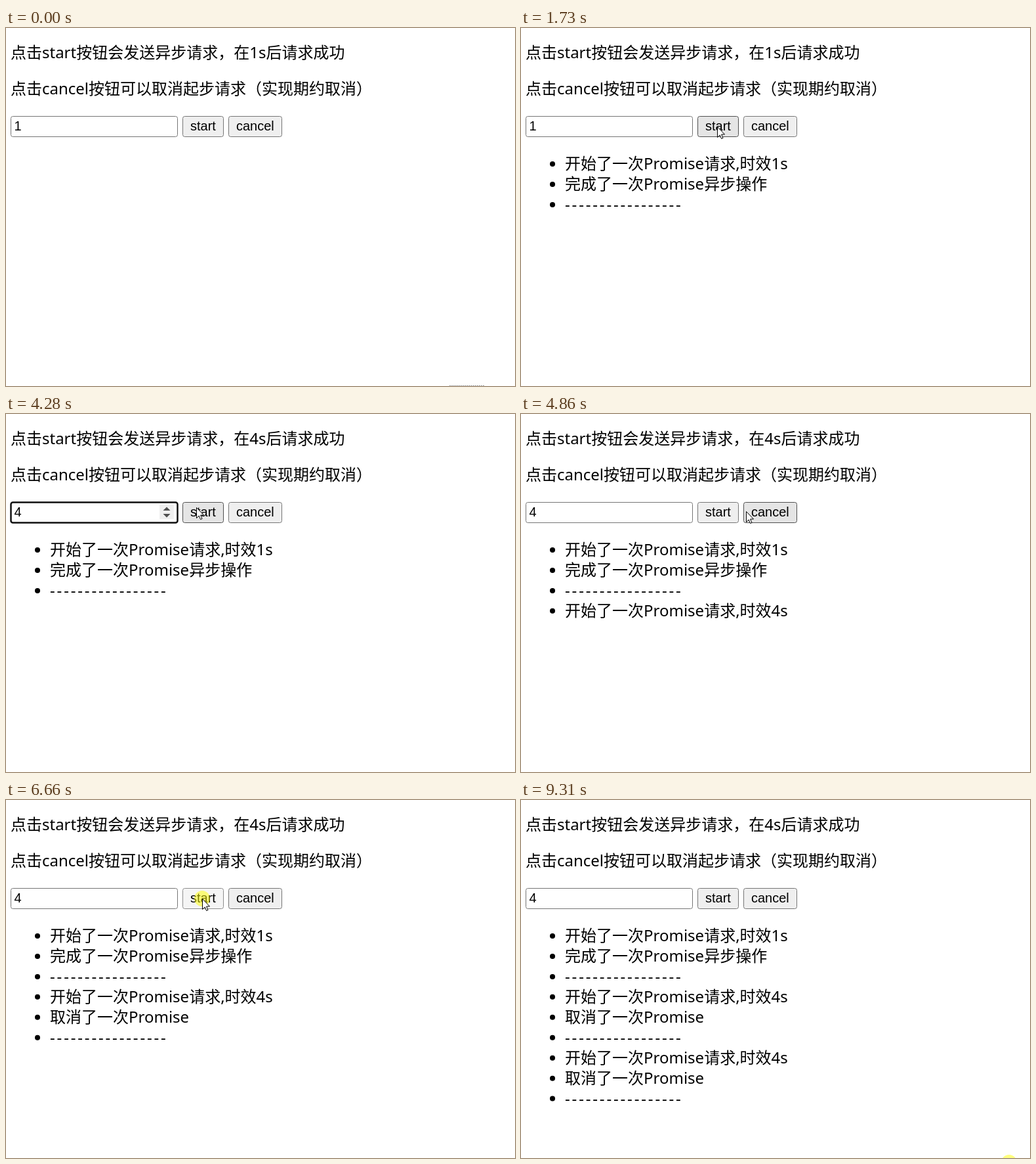
Animation, 776 px wide and 545 px high, one loop 9360 ms. Source, as an HTML page:

```html
<!DOCTYPE html>
<html lang="zh-CN">
<head>
<meta charset="utf-8">
<style>
  html, body { margin: 0; width: 100%; height: 100%; overflow: hidden; background: #fff; }
  svg { display: block; }
  text { font: 24px "Noto Sans", "Noto Sans CJK SC", sans-serif; white-space: pre; }
  .ui { font: 20px "Liberation Sans", Arial, sans-serif; }
  .rule { letter-spacing: 2.84px; font-weight: 300; }
  .button rect { fill: #efefef; stroke: #767676; }
  .button.hover rect { fill: #e5e5e5; stroke: #4f4f4f; }
  .button.down rect { fill: #f5f5f5; stroke: #8d8d8d; }
</style>
</head>
<body>
<svg width="776" height="545" viewBox="0 0 776 545">
  <text id="intro" x="7" y="46"></text>
  <text x="7" y="101">点击cancel按钮可以取消起步请求（实现期约取消）</text>
  <rect id="field" x="7.5" y="134.5" width="254" height="31" rx="3" fill="#fff"/>
  <text id="value" class="ui" x="12.5" y="156"></text>
  <g id="spinner">
    <path fill="#efefef" d="M234 138h22v22h-22z"/>
    <path id="up" fill="#d0d0d0" d="M234 138h22v11h-22z"/>
    <path fill="#505050" d="M239.5 147l5.5-5.5 5.5 5.5zM239.5 152l5.5 5.5 5.5-5.5z"/>
  </g>
  <g id="start" class="button">
    <rect x="269.5" y="134.5" width="62" height="31" rx="3"/>
    <text class="ui" x="281" y="156">start</text>
  </g>
  <g id="cancel" class="button">
    <rect x="339.5" y="134.5" width="81" height="31" rx="3"/>
    <text class="ui" x="351" y="156">cancel</text>
  </g>
  <g id="list"></g>
  <path id="dots" d="M676 544.5h53" stroke="#999" stroke-dasharray="2 1"/>
  <g id="pointer">
    <circle id="glow" r="12" fill="#ff0" fill-opacity=".5"/>
    <path d="M.5 .5V16.5L4.2 13L6.6 18.5L9 17.5L6.6 12H11.5Z" fill="#fff" stroke="#000"/>
  </g>
</svg>
<script>
const LOOP = 9360, HOLD = 90, ROW = 30.95;
const SPIN = 3410, SPIN_GAP = 180, SPIN_LAG = 50, SPINS = 3, STOP = 9310;
const $ = id => document.getElementById(id);
const clamp = (v, lo, hi) => Math.min(hi, Math.max(lo, v));

// each request begins with a click on start; all but the first end with a click on cancel
const requests = [
  { begin: 720, end: 1730, secs: 1 },
  { begin: 4430, end: 5390, secs: 4, cancelled: true },
  { begin: 6740, end: 8140, secs: 4, cancelled: true }
];

// pointer moves: leave, arrive, x, y
const enter = [680, 548];
const moves = [
  [30, 600, 299, 150], [1880, 2160, 308, 267], [2390, 2850, 240, 141],
  [3880, 4280, 290, 142], [4480, 5040, 360, 150], [5400, 5620, 381, 222],
  [5620, 6500, 299, 150], [7020, 7550, 360, 150], [8290, 8950, 744, 552]
];

const presses = requests.flatMap(r => r.cancelled ? [r.begin - HOLD, r.end - HOLD] : [r.begin - HOLD]);
for (let i = 0; i < SPINS; i++) presses.push(SPIN + i * SPIN_GAP);
presses.push(STOP);

const rows = requests.flatMap(({ begin, end, secs, cancelled }) => [
  { at: begin, label: `开始了一次Promise请求,时效${secs}s` },
  { at: end, label: cancelled ? "取消了一次Promise" : "完成了一次Promise异步操作" },
  { at: end, label: "-".repeat(17), kind: "rule" }
]);
for (const [i, row] of rows.entries()) {
  row.el = document.createElementNS("http://www.w3.org/2000/svg", "g");
  row.el.setAttribute("transform", `translate(0 ${ROW * i})`);
  row.el.innerHTML = `<circle cx="48" cy="207" r="4"/>
    <text class="${row.kind || ""}" x="67" y="215">${row.label}</text>`;
  $("list").append(row.el);
}

function tipAt(t) {
  let [x, y] = enter;
  for (const [leave, arrive, toX, toY] of moves) {
    const u = clamp((t - leave) / (arrive - leave), 0, 1), ease = u * u * (3 - 2 * u);
    x += (toX - x) * ease;
    y += (toY - y) * ease;
  }
  return [x, y];
}

function show(el, on) { el.style.display = on ? "" : "none"; }

function draw(t) {
  const [x, y] = tipAt(t);
  const over = (left, right, top = 134, bottom = 166) =>
    x >= left && x <= right && y >= top && y <= bottom;
  const down = presses.some(p => t >= p && t < p + HOLD);
  const value = 1 + clamp(Math.floor((t - SPIN - SPIN_LAG) / SPIN_GAP) + 1, 0, SPINS);
  const focus = t >= SPIN + SPIN_LAG && t < requests[1].begin - HOLD;
  const hover = over(7, 262);

  $("intro").textContent = `点击start按钮会发送异步请求，在${value}s后请求成功`;
  $("value").textContent = value;
  $("field").setAttribute("stroke", focus ? "#101010" : hover ? "#4f4f4f" : "#767676");
  $("field").setAttribute("stroke-width", focus ? 2.5 : 1);
  show($("spinner"), hover || focus);
  show($("up"), over(234, 256, 138, 149));

  for (const [id, left, right] of [["start", 269, 332], ["cancel", 339, 421]]) {
    const on = over(left, right);
    $(id).classList.toggle("hover", on);
    $(id).classList.toggle("down", on && down);
  }
  for (const row of rows) show(row.el, t >= row.at);
  show($("dots"), t < moves[0][0]);
  show($("pointer"), t >= moves[0][0]);
  show($("glow"), down);
  $("pointer").setAttribute("transform", `translate(${Math.round(x)} ${Math.round(y)})`);
}

const origin = performance.now();
function tick() {
  draw((performance.now() - origin) % LOOP);
  requestAnimationFrame(tick);
}
tick();
</script>
</body>
</html>
```
